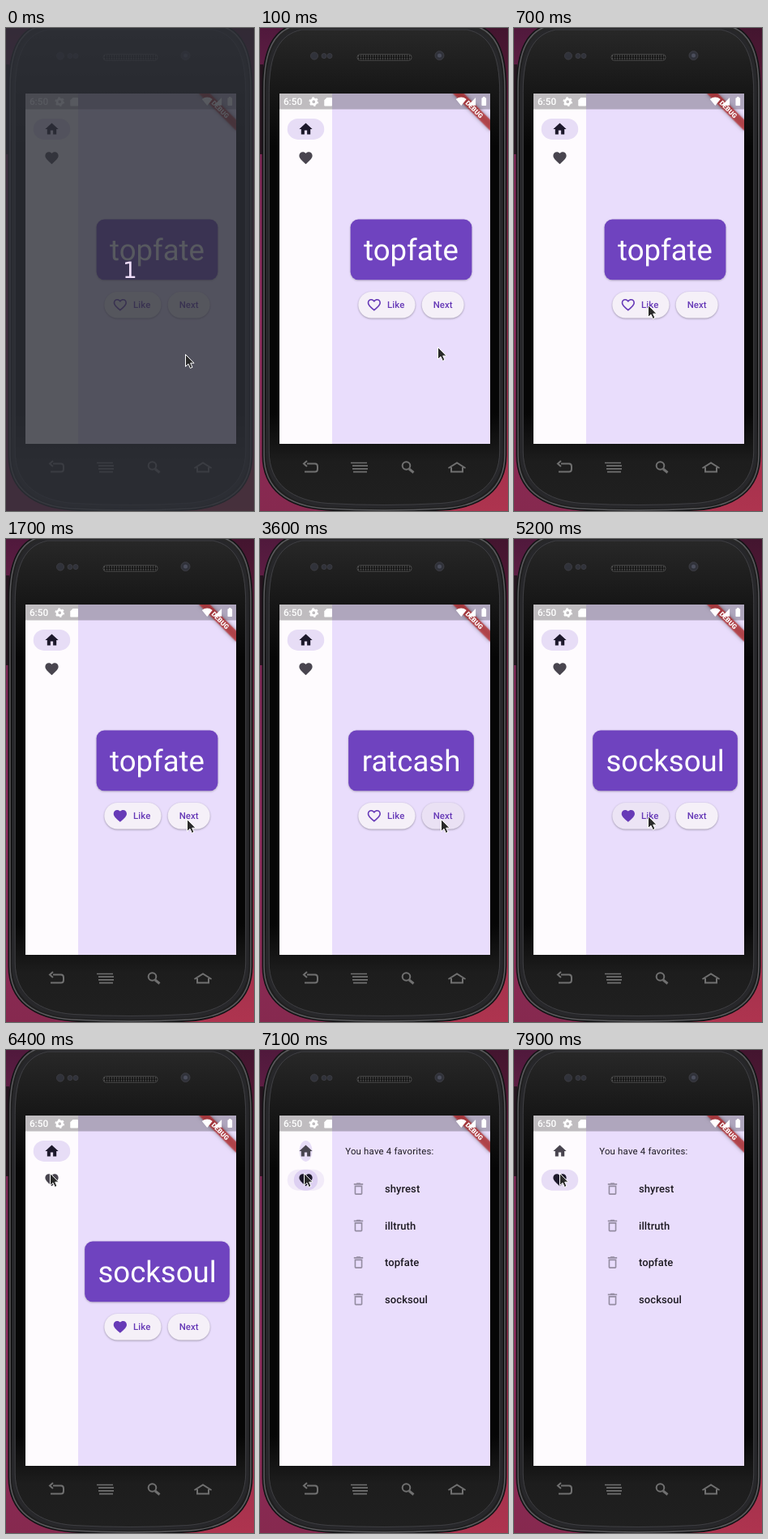
Write an HTML page that moves like this. It is 306 px wide and 597 px high and loops after 8000 ms.

```html
<!DOCTYPE html>
<html lang="en">
<head>
<meta charset="utf-8">
<title>Word pair app</title>
<style>
html, body { margin: 0; width: 100%; height: 100%; overflow: hidden; background: #4a1738; }
svg { display: block; width: 306px; height: 597px; font-family: Roboto, sans-serif; text-rendering: geometricPrecision; }
.label { font-size: 14px; font-weight: 500; letter-spacing: .1px; fill: #673ab7; }
.item { font-size: 16px; font-weight: 500; letter-spacing: .1px; fill: #1d1a22; }
.raised { fill: #f5f0f8; filter: drop-shadow(0 1.3px 1px #0005); }
</style>
</head>
<body>
<svg viewBox="0 0 306 597">
  <defs>
    <linearGradient id="wallLeft" x2="0" y2="1">
      <stop stop-color="#50193c"/><stop offset=".25" stop-color="#7a2653"/>
      <stop offset=".6" stop-color="#8f2b5e"/><stop offset="1" stop-color="#86294f"/>
    </linearGradient>
    <linearGradient id="wallRight" x2="0" y2="1">
      <stop stop-color="#43152f"/><stop offset=".3" stop-color="#70213f"/>
      <stop offset="1" stop-color="#ae344f"/>
    </linearGradient>
    <linearGradient id="face" x2="0" y2="1">
      <stop stop-color="#292929"/><stop offset=".13" stop-color="#181818"/>
      <stop offset=".25" stop-color="#060606"/><stop offset=".8" stop-color="#060606"/>
      <stop offset=".9" stop-color="#1d1d1d"/><stop offset="1" stop-color="#202020"/>
    </linearGradient>
    <pattern id="mesh" width="3" height="3" patternUnits="userSpaceOnUse">
      <rect width="3" height="3" fill="#111"/><circle cx="1.5" cy="1.5" r=".9" fill="#555"/>
    </pattern>
    <path id="body" d="M5 75C5 28 17 2 47-4H260C290 2 302 28 302 75V528C302 570 272 591 226 594Q153 598 81 594C35 591 5 570 5 528Z"/>
    <path id="home" d="M10 20v-6h4v6h5v-8h3L12 3 2 12h3v8z"/>
    <path id="heart" d="M12 21.35l-1.45-1.32C5.4 15.36 2 12.28 2 8.5 2 5.42 4.42 3 7.5 3c1.74 0 3.41.81 4.5 2.09C13.09 3.81 14.76 3 16.5 3 19.58 3 22 5.42 22 8.5c0 3.78-3.4 6.86-8.55 11.54z"/>
    <path id="hollow" fill-rule="evenodd" d="M12 21.35l-1.45-1.32C5.4 15.36 2 12.28 2 8.5 2 5.42 4.42 3 7.5 3c1.74 0 3.41.81 4.5 2.09C13.09 3.81 14.76 3 16.5 3 19.58 3 22 5.42 22 8.5c0 3.78-3.4 6.86-8.55 11.54zM12 18.65C7.14 14.24 4 11.39 4 8.5 4 6.5 5.5 5 7.5 5c1.54 0 3.04.99 3.57 2.36h1.87C13.46 5.99 14.96 5 16.5 5c2 0 3.5 1.5 3.5 3.5 0 2.89-3.14 5.74-8 10.15z"/>
    <path id="bin" d="M6 19c0 1.1.9 2 2 2h8c1.1 0 2-.9 2-2V7H6zM8 9h8v10H8zM15.5 4l-1-1h-5l-1 1H5v2h14V4z" fill-rule="evenodd"/>
    <clipPath id="screenClip"><path d="M0 0H320V533H0Z"/></clipPath>
    <clipPath id="likeClip"><rect x="119.8" y="301.5" width="86.4" height="40" rx="20"/></clipPath>
    <clipPath id="nextClip"><rect x="216.2" y="301.5" width="64" height="40" rx="20"/></clipPath>
    <clipPath id="railClip"><rect x="12" y="82" width="56" height="32" rx="16"/></clipPath>
  </defs>

  <!-- phone -->
  <path fill="url(#wallLeft)" d="M0 0H153V597H0Z"/>
  <path fill="url(#wallRight)" d="M153 0H306V597H153Z"/>
  <path fill="#25151f" d="M0 45H4V156H0Z"/>
  <g fill="none">
    <use href="#body" stroke="#141416" stroke-width="5"/>
    <use href="#body" fill="url(#face)" stroke="#59595c" stroke-width="1.6"/>
    <use href="#body" stroke="#27272a" stroke-width="5" transform="translate(4.6 4.5) scale(.97 .985)"/>
    <use href="#body" stroke="#47474a" stroke-width=".8" transform="translate(6.4 6) scale(.958 .979)"/>
  </g>
  <rect x="120" y="32.500" width="67" height="7.500" rx="3.500" fill="url(#mesh)" stroke="#4a4a4a"/>
  <g fill="#30323a" stroke="#3c3c42">
    <circle cx="67" cy="34.500" r="4.500"/><circle cx="79" cy="34.500" r="3"/>
    <circle cx="86" cy="34.500" r="3"/><circle cx="221.500" cy="34" r="5.500"/>
  </g>
  <circle cx="221.500" cy="34" r="2.500" fill="#4b4e5c"/>
  <g fill="none" stroke="#707070" stroke-width="2">
    <path d="M58 538.500H68Q71 538.500 71 542V545Q71 548.500 68 548.500H55M58 535L54 538.500 58 542"/>
    <path d="M112 537.500H132M114 541.200H133M114 544.900H133M115 548.600H132" stroke-width="1.700"/>
    <circle cx="180.500" cy="541" r="4.800"/><path d="M184 545L189.500 549.500" stroke-width="3"/>
    <path d="M232.500 544L243 537.500 253.500 544M236 543V548.500H250V543"/>
  </g>

  <!-- app, in 320-wide layout units -->
  <g transform="translate(24 81) scale(.8125)" clip-path="url(#screenClip)">
    <path fill="#e9ddfc" d="M0 0H320V533H0Z"/>
    <path fill="#fefbfe" d="M0 0H80V533H0Z"/>
    <rect id="pillHome" y="38" height="32" rx="16" fill="#e7ddf6"/>
    <rect id="pillHeart" y="82" height="32" rx="16" fill="#e7ddf6"/>
    <g clip-path="url(#railClip)"><circle id="railInk" fill="#673ab7"/></g>
    <use id="homeIcon" href="#home" x="28" y="42"/>
    <use id="heartIcon" href="#heart" x="28" y="86"/>

    <g id="generator">
      <rect id="card" y="191.500" height="92" rx="12" fill="#6f43bf" style="filter:drop-shadow(0 1px 1px #0004)"/>
      <text id="word" x="200" y="253" font-size="45" fill="#fff" text-anchor="middle"></text>
      <rect class="raised" x="119.800" y="301.500" width="86.400" height="40" rx="20"/>
      <rect class="raised" x="216.200" y="301.500" width="64" height="40" rx="20"/>
      <g clip-path="url(#likeClip)"><circle id="likeInk" fill="#673ab7"/></g>
      <g clip-path="url(#nextClip)"><circle id="nextInk" fill="#673ab7"/></g>
      <use id="likeIcon" x="131.800" y="309.500" fill="#673ab7"/>
      <text class="label" x="163.800" y="326.500">Like</text>
      <text class="label" x="248.200" y="326.500" text-anchor="middle">Next</text>
    </g>
    <g id="favorites">
      <text x="100" y="59" font-size="14" letter-spacing=".25" fill="#1d1a22">You have 4 favorites:</text>
    </g>

    <path fill="#000" opacity=".25" d="M0 0H320V24H0Z"/>
    <g transform="translate(320 0) rotate(45)">
      <rect x="-40" y="28" width="80" height="12" fill="#b71c1c" fill-opacity=".68" style="filter:drop-shadow(0 0 3px #0008)"/>
      <text y="37.700" font-size="10.200" font-weight="900" fill="#fff" text-anchor="middle">DEBUG</text>
    </g>
    <g fill="#fff">
      <text x="6" y="17.300" font-size="14.500" font-weight="500">6:50</text>
      <circle cx="52" cy="12.500" r="4" fill="none" stroke="#fff" stroke-width="3.400"/>
      <circle cx="52" cy="12.500" r="6.200" fill="none" stroke="#fff" stroke-width="2" stroke-dasharray="3 3.490"/>
      <path d="M72 6H79Q80 6 80 7V18Q80 19 79 19H69Q68 19 68 18V10Z"/>
      <path d="M268 8.500Q276 2.500 284 8.500L276 18.500Z"/>
      <path d="M298 6V18H286Z"/>
      <path d="M308 6.500H309V5H312V6.500H313Q314 6.500 314 7.500V17.500Q314 18.500 313 18.500H308Q307 18.500 307 17.500V7.500Q307 6.500 308 6.500Z"/>
    </g>
  </g>

  <g id="countdown">
    <path fill="#2d3038" opacity=".8" d="M0 0H306V597H0Z"/>
    <text x="153" y="309" font-family="DejaVu Sans, sans-serif" font-size="28" fill="#eedcf8" text-anchor="middle">1</text>
  </g>
  <path id="cursor" d="M.5.5V15.500L4 12.200 6.400 17.500 9 16.300 6.700 11.200H11Z" fill="#2a2a2a" stroke="#fff" stroke-width="1"/>
</svg>

<script>
const LOOP = 8000, STEP = 100;
const $ = id => document.getElementById(id);
const clamp = v => Math.max(0, Math.min(1, v));
const smooth = v => v * v * (3 - 2 * v);
const show = (id, on) => $(id).style.display = on ? '' : 'none';
const set = (id, attrs) => {
  for (const k in attrs) $(id).setAttribute(k, attrs[k]);
};

// pointer stops: time, x, y
const path = [
  [0, 221, 403], [100, 219, 394], [700, 165, 342], [1200, 165, 342],
  [1700, 223, 346], [4200, 223, 346], [4300, 218, 348], [4500, 165, 342],
  [5500, 165, 342], [6100, 46, 140], [6200, 46, 140], [6400, 54, 152],
  [7800, 54, 152], [7900, 56, 152], [LOOP, 56, 152]
];
// card widths follow the text advance plus padding
const words = [
  { from: 0, text: 'topfate', width: 184.3, liked: 1200 },
  { from: 2300, text: 'ratcash', width: 190.4, liked: LOOP },
  { from: 3700, text: 'socksoul', width: 219.9, liked: 4900 }
];
// ink ripples: element, centre, duration, start times
const inks = [
  ['likeInk', 174, 322, 700, [1000, 4700]],
  ['nextInk', 245, 327, 600, [2100, 3500]],
  ['railInk', 37, 88, 600, [6800]]
];

$('favorites').innerHTML += ['shyrest', 'illtruth', 'topfate', 'socksoul'].map((name, i) =>
  `<use href="#bin" x="108" y="${99.5 + 56 * i}" fill="#958da2"/>
   <text class="item" x="160" y="${117 + 56 * i}">${name}</text>`).join('');

function pointer(t) {
  const i = path.findIndex(p => p[0] > t);
  const [t0, x0, y0] = path[i - 1], [t1, x1, y1] = path[i];
  const k = smooth((t - t0) / (t1 - t0));
  return [x0 + (x1 - x0) * k, y0 + (y1 - y0) * k];
}

function pill(id, size) {
  set(id, { x: 40 - 28 * size, width: 56 * size, opacity: clamp(size * 3) });
}

function draw(t) {
  const onList = t >= 7000;
  const word = words.findLast(w => t >= w.from);
  show('countdown', t < 100);
  show('generator', !onList);
  show('favorites', onList);

  $('word').textContent = word.text;
  set('card', { x: 200 - word.width / 2, width: word.width });
  set('likeIcon', { href: t >= word.liked ? '#heart' : '#hollow' });

  for (const [id, cx, cy, span, starts] of inks) {
    const age = t - (starts.findLast(s => t >= s) ?? -LOOP);
    const opacity = .08 * clamp(age / 100) * clamp((span - age) / 250);
    set(id, { cx, cy, r: 40 + 50 * clamp(age / 300), opacity });
  }

  const swap = smooth(clamp((t - 6950) / 250));
  pill('pillHome', 1 - swap);
  pill('pillHeart', swap);
  set('homeIcon', { fill: onList ? '#49454f' : '#1d192b' });
  set('heartIcon', { fill: onList ? '#1d192b' : '#49454f' });
  set('cursor', { transform: `translate(${pointer(t)})` });
}

const begin = performance.now();
function tick() {
  const t = (performance.now() - begin) % LOOP;
  draw(Math.floor(t / STEP) * STEP);
  requestAnimationFrame(tick);
}
tick();
</script>
</body>
</html>
```
